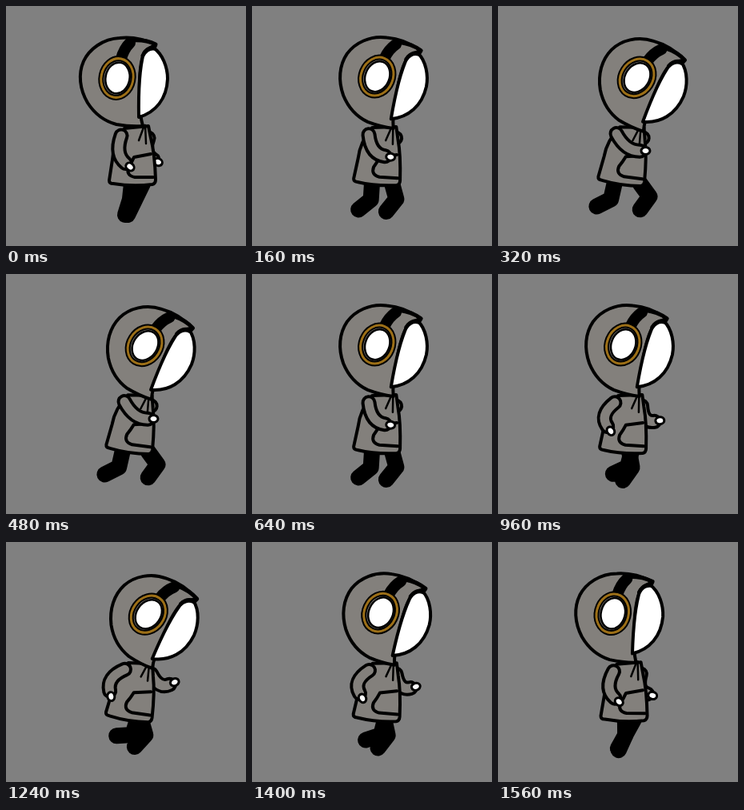
Recreate the animation shown at these times as an HTML page with a canvas. Size 300 px wide and 300 px high, loop 1600 ms.

```html
<!DOCTYPE html>
<html lang="en">
<head>
<meta charset="utf-8">
<title>Walk cycle</title>
<style>
html, body { margin: 0; height: 100%; overflow: hidden; background: #808080; }
canvas { display: block; width: 100vw; height: 100vh; }
</style>
</head>
<body>
<canvas id="stage" width="300" height="300"></canvas>
<script>
const ctx = document.getElementById('stage').getContext('2d');
const LOOP = 1600, STEP = 40;
const BACK = '#808080', INK = '#000', CLOTH = '#83807c', GOLD = '#9c6f17', WHITE = '#fff';

const hood = new Path2D('M187 48C176 43 160 38 142 40C121 41 104 54 97 69C90 85 92 104 102 121C111 135 123 144 138 148Q155 151 171 150Q167 136 167 110Q166 72 173 58Q179 52 187 48Z');
const face = new Path2D('M172 59Q177 51 184 52C196 60 202 77 202 91C201 116 187 133 166 139Q165 85 172 59Z');
const brim = new Path2D('M158 43Q175 42 187 48L185 53Q176 52 171 62');
const band = new Path2D('M144 66Q147 54 155 46');
const torso = new Path2D('M148 153Q134 172 133 192L129 218Q129 222 134 222Q158 226 183 223Q187 222 187 217Q186 185 181 165L178 150Z');
const pocket = new Path2D('M181 185L160 189Q157 196 153 202Q150 212 161 214L184 214');
const strings = new Path2D('M173 149L166 168M174 149L175 172');

function line(color, width, path) {
  ctx.strokeStyle = color;
  ctx.lineWidth = width;
  ctx.stroke(path);
}

function shape(path, fill, width = 4) {
  ctx.fillStyle = fill;
  ctx.fill(path);
  line(INK, width, path);
}

function ellipse(x, y, rx, ry, rot = 0) {
  const p = new Path2D();
  p.ellipse(x, y, rx, ry, rot, 0, Math.PI * 2);
  return p;
}

function turned(deg, x, y, draw) {
  ctx.save();
  ctx.translate(x, y);
  ctx.rotate(deg * Math.PI / 180);
  ctx.translate(-x, -y);
  draw();
  ctx.restore();
}

// Position of a hand or foot: rest point plus a share of its full reach.
function reach(swing, rest, front, back) {
  const to = swing > 0 ? front : back, k = Math.abs(swing);
  return [rest[0] + to[0] * k, rest[1] + to[1] * k];
}

// Middle joint of a limb made of two equal bones; side picks the bend.
function joint([ax, ay], [bx, by], bone, side) {
  const dx = bx - ax, dy = by - ay, d = Math.hypot(dx, dy);
  const h = side * Math.sqrt(Math.max(0, bone * bone - d * d / 4)) / d;
  return [(ax + bx) / 2 + dy * h, (ay + by) / 2 - dx * h];
}

function arm(shoulder, hand, bone) {
  const [ex, ey] = joint(shoulder, hand, bone * 1.08, -1);
  const a = Math.atan2(hand[1] - ey, hand[0] - ex);
  const sleeve = new Path2D();
  sleeve.moveTo(...shoulder);
  sleeve.quadraticCurveTo(ex, ey, hand[0] - 7 * Math.cos(a), hand[1] - 7 * Math.sin(a));
  line(INK, 19, sleeve);
  line(CLOTH, 11, sleeve);
  shape(ellipse(...hand, 5.5, 4.5, a), WHITE, 3);
}

function leg(hip, foot) {
  const p = new Path2D();
  p.moveTo(...hip);
  p.lineTo(...joint(hip, foot, 20, 1));
  p.lineTo(...foot);
  line(INK, 20, p);
}

function drawBody() {
  shape(torso, CLOTH);
  line(INK, 4, pocket);
  line(INK, 2.5, strings);
}

function drawHead() {
  shape(hood, CLOTH);
  shape(face, WHITE);
  line(INK, 5, brim);
  line(INK, 14, band);
  const ring = ellipse(139, 90, 20, 24.5, 0.2);
  shape(ring, CLOTH, 7);
  line(GOLD, 3, ring);
  shape(ellipse(139.5, 90, 15, 19.5, 0.2), WHITE, 2.5);
}

function draw(t) {
  const lean = 1 - Math.abs(t % 800 - 400) / 400;
  const swing = Math.sin(t / LOOP * 2 * Math.PI);

  ctx.fillStyle = BACK;
  ctx.fillRect(0, 0, 300, 300);
  ctx.lineCap = ctx.lineJoin = 'round';

  arm([178 + 4 * lean, 165], reach(-swing, [190, 195], [21, -20], [-30, -10]), 20);
  leg([157 - 12 * swing, 222], reach(swing, [149, 261], [-27, -11], [12, -5]));
  leg([171 + 7 * swing, 222], reach(swing, [152, 261], [27, -7], [-14, -19]));
  turned(9 * lean, 165, 187, drawBody);
  arm([144 + 5 * lean, 162 - 3 * lean], reach(swing, [155, 201], [31, -21], [-24, -8]), 23);
  turned(26.5 * lean, 158, 182, drawHead);
}

function tick() {
  draw(Math.floor(performance.now() % LOOP / STEP) * STEP);
  requestAnimationFrame(tick);
}
tick();
</script>
</body>
</html>
```
